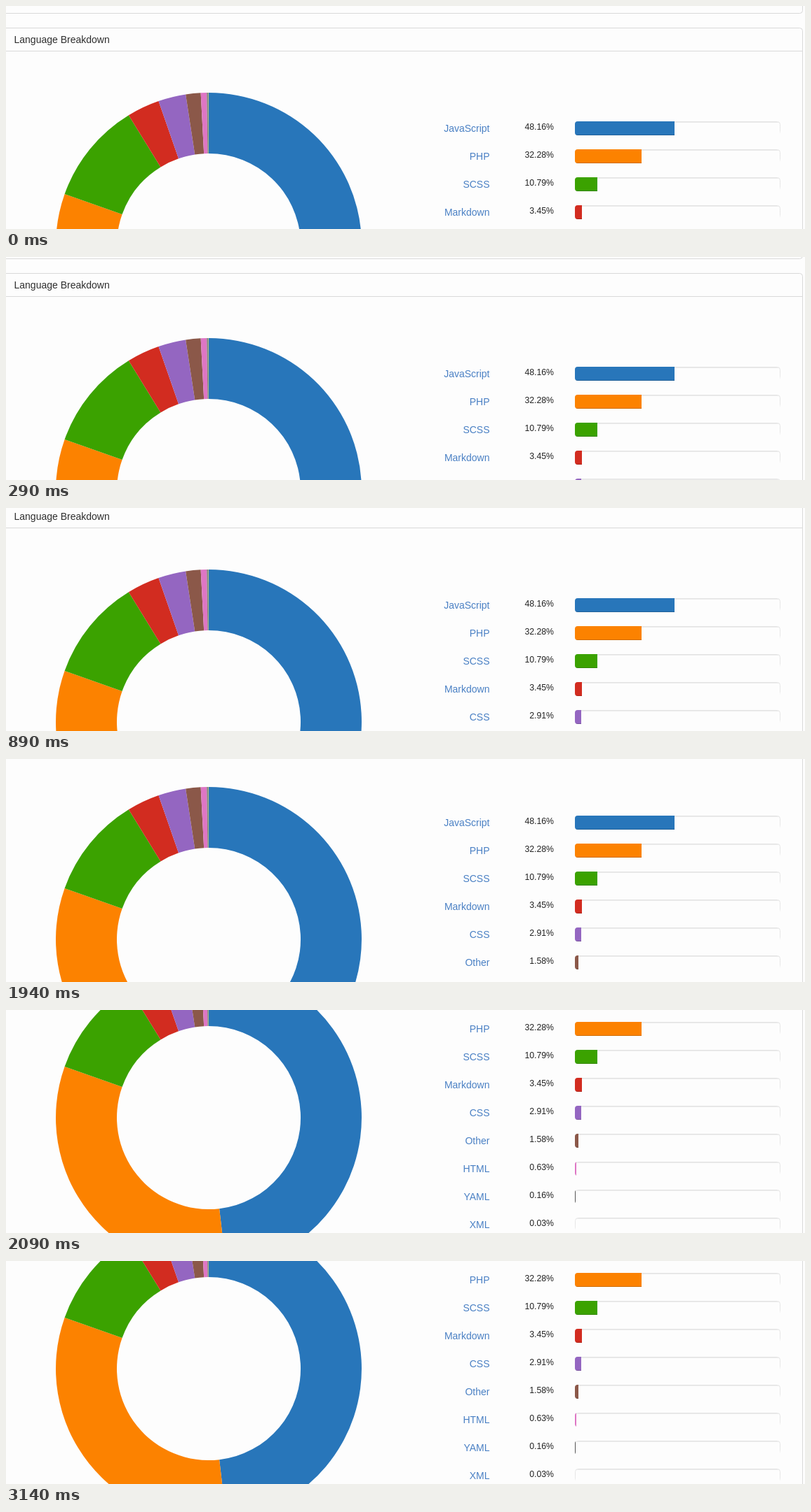
Write an HTML page that moves like this. It is 1139 px wide and 319 px high and loops after 4120 ms.

```html
<!DOCTYPE html>
<html lang="en">
<head>
<meta charset="utf-8">
<title>Language Breakdown</title>
<style>
  html, body { margin: 0; width: 100%; height: 100%; overflow: hidden; background: #fdfdfd; }
  svg { display: block; font-family: "Liberation Sans", Arial, sans-serif; }
  .border { fill: none; stroke: #d9d9d9; }
  .title { font-size: 14px; fill: #2e2e2e; }
  .name { font-size: 14px; fill: #4a80c4; text-anchor: end; }
  .share { font-size: 12.25px; fill: #222; text-anchor: end; }
</style>
</head>
<body>
<svg width="1139" height="319" viewBox="0 0 1139 319">
  <defs>
    <linearGradient id="edge" gradientUnits="userSpaceOnUse" x1="0" y1="0" x2="0" y2="18">
      <stop offset="0" stop-color="#e4e4e4"/>
      <stop offset=".75" stop-color="#e8e8e8"/>
      <stop offset="1" stop-color="#fdfdfd"/>
    </linearGradient>
    <clipPath id="track"><rect width="293" height="20" rx="4"/></clipPath>
  </defs>
  <g id="page">
    <path class="border" d="M-9 10.5H1131.5a4 4 0 0 0 4-4V-9"/>
    <path class="border" d="M-9 31.5H1131.5a4 4 0 0 1 4 4V700M-9 64.5H1135"/>
    <text class="title" x="11.5" y="53">Language Breakdown</text>
    <g id="donut" transform="translate(289 342)"></g>
    <g id="rows"></g>
  </g>
  <path id="cursor" d="M0 0V16l4-4h7z" fill="#111" stroke="#fff" stroke-width=".6"/>
</svg>
<script>
const languages = [
  ["JavaScript", 48.16, "#2876ba"],
  ["PHP", 32.28, "#fc8200"],
  ["SCSS", 10.79, "#3ba200"],
  ["Markdown", 3.45, "#d22c20"],
  ["CSS", 2.91, "#9466c1"],
  ["Other", 1.58, "#8b5849"],
  ["HTML", 0.63, "#de76c4"],
  ["YAML", 0.16, "#7f7f7f"],
  ["XML", 0.03, "#b9bf2c"]
];
const LOOP = 4120;
// [start time in ms, scroll offset in px]
const scrollSteps = [[0, 0], [150, 4], [290, 8], [890, 36], [1040, 72], [1940, 84], [2090, 188]];
// [start time in ms, cursor position]
const cursorSteps = [[0, null], [2840, "1130 314"], [2990, "1117 318"], [3140, null]];

const byId = id => document.getElementById(id);

function add(parent, tag, attrs, text) {
  const node = document.createElementNS("http://www.w3.org/2000/svg", tag);
  for (const key in attrs) node.setAttribute(key, attrs[key]);
  if (text) node.textContent = text;
  return parent.appendChild(node);
}

function point(radius, percent) {
  const angle = percent / 50 * Math.PI;
  return `${(radius * Math.sin(angle)).toFixed(2)} ${(-radius * Math.cos(angle)).toFixed(2)}`;
}

function ringSlice(from, to, outer = 218, inner = 131) {
  return `M${point(outer, from)}A${outer} ${outer} 0 0 1 ${point(outer, to)}` +
    `L${point(inner, to)}A${inner} ${inner} 0 0 0 ${point(inner, from)}Z`;
}

function addRow(name, share, color, y) {
  const rows = byId("rows");
  add(rows, "text", { class: "name", x: 689.5, y: y + 15 }, name);
  add(rows, "text", { class: "share", x: 781, y: y + 12 }, share.toFixed(2) + "%");

  const bar = add(rows, "g", { transform: `translate(811 ${y})` });
  add(bar, "path", { d: "M.5 18V4.5a4 4 0 0 1 4-4H288.5a4 4 0 0 1 4 4V18", fill: "none", stroke: "url(#edge)" });
  add(bar, "rect", { x: 2, y: 1, width: 289, height: 1, fill: "#ebebeb" });

  const width = share < 0.1 ? 0 : Math.max(1, Math.round(share * 2.94));
  const fill = add(bar, "g", { "clip-path": "url(#track)" });
  add(fill, "rect", { width, height: 20, fill: width === 1 ? "#555" : color });
  add(fill, "rect", { y: 19, width, height: 1, fill: "#000", opacity: 0.18 });
}

let total = 0;
languages.forEach(([name, share, color], i) => {
  add(byId("donut"), "path", { d: ringSlice(total, total + share), fill: color });
  total += share;
  addRow(name, share, color, 165 + 40 * i);
});

const valueAt = (steps, time) => steps.filter(([start]) => start <= time).pop()[1];

function render(time) {
  byId("page").setAttribute("transform", `translate(0 ${-valueAt(scrollSteps, time)})`);
  const place = valueAt(cursorSteps, time);
  byId("cursor").setAttribute("visibility", place ? "visible" : "hidden");
  if (place) byId("cursor").setAttribute("transform", `translate(${place})`);
}

const begin = performance.now();
function tick() {
  render((performance.now() - begin) % LOOP);
  requestAnimationFrame(tick);
}
tick();
</script>
</body>
</html>
```
